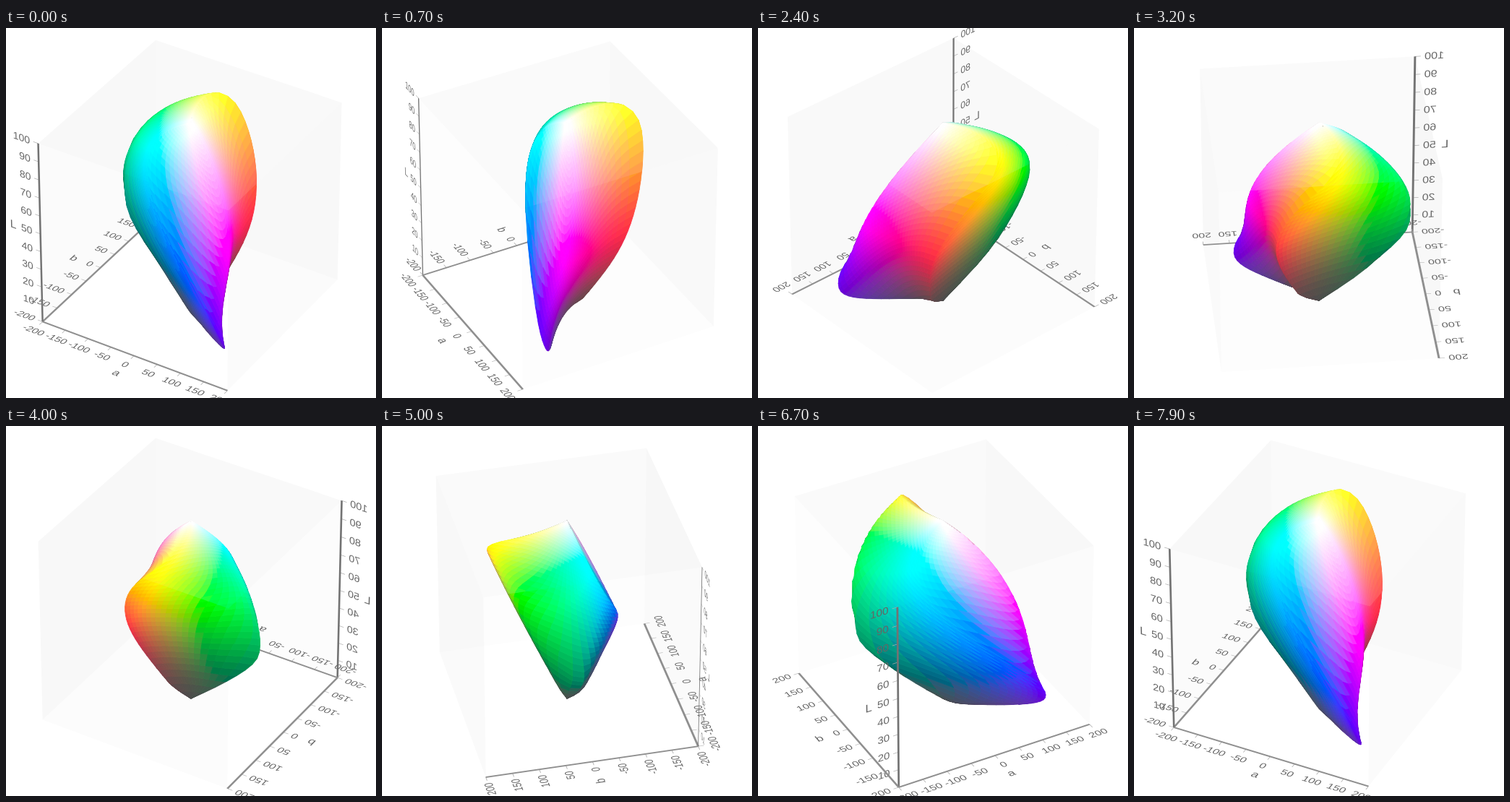
A matplotlib script that plays this animation: 512x512 px, repeating every 8000 ms.

```python
import numpy as np
import matplotlib.pyplot as plt
from matplotlib.animation import FuncAnimation
from matplotlib.collections import PolyCollection
from matplotlib.patches import PathPatch
from matplotlib.path import Path
from matplotlib.textpath import TextPath

SIZE, FRAMES, INTERVAL = 512, 80, 100
POSES = 144                       # distinct poses in one full turn
SIDE = 301.0                      # cube edge in pixels
DISTANCE = 6000.0                 # camera distance
SIN_E, COS_E = np.sqrt(1 / 3), np.sqrt(2 / 3)
WHITE = np.array([0.9505, 1.0, 1.089])
XYZ_TO_RGB = np.array([[3.2406, -1.5372, -0.4986],
                       [-0.9689, 1.8758, 0.0415],
                       [0.0557, -0.2040, 1.0570]])
EXPOSURE, HAZE, TOP_HAZE = 1.15, 0.07, 0.115
X, Y, Z = np.eye(3)


def project(points, theta):
    """Screen position and depth of points in the turning cube."""
    x, y, z = np.moveaxis(np.asarray(points), -1, 0)
    c, s = np.cos(theta), np.sin(theta)
    side, toward = x * c + y * s, x * s - y * c
    depth = toward * COS_E + z * SIN_E
    up = z * COS_E - toward * SIN_E
    scale = DISTANCE / (DISTANCE - depth)
    return np.stack([256 + side * scale, 256 - up * scale], -1), depth


# ---- colour solid -------------------------------------------------------

def lobe(lam, peak, left, right):
    return np.exp(-0.5 * ((lam - peak) / np.where(lam < peak, left, right)) ** 2)


def stimulus(lam):
    """Colour matching functions weighted by daylight."""
    x = (1.056 * lobe(lam, 599.8, 37.9, 31.0) + 0.362 * lobe(lam, 442.0, 16.0, 26.7)
         - 0.065 * lobe(lam, 501.1, 20.4, 26.2))
    y = 0.821 * lobe(lam, 568.8, 46.9, 40.5) + 0.286 * lobe(lam, 530.9, 16.3, 31.1)
    z = 1.217 * lobe(lam, 437.0, 11.8, 36.0) + 0.681 * lobe(lam, 459.0, 26.0, 13.8)
    y = np.where(lam < 430, 0.037 * x, y)
    x = np.where(lam > 645, 2.68 * y, x)
    light = np.interp(lam, [400, 430, 460, 490, 560, 600, 700],
                      [83, 89, 118, 109, 100, 90, 72])
    return np.stack([x, y, z], -1) * light[:, None]


def optimal_solid(rows, cols):
    """Grid of relative XYZ for every band-pass and band-stop colour."""
    spectrum = stimulus(np.linspace(400, 700, 601))
    total = np.cumsum(spectrum, axis=0)
    total = (total - total[0]) / (total[-1] - total[0])
    u = total.sum(1) + np.linspace(0, 0.15, len(total))
    u /= u[-1]

    def integral(t):
        turns = np.floor(t)
        part = [np.interp(t - turns, u, total[:, i]) for i in range(3)]
        return np.stack(part, -1) + turns[..., None]

    width = (0.5 - 0.5 * np.cos(np.linspace(0, np.pi, rows + 1)))[:, None]
    steps = np.linspace(0, 1, cols + 1)
    # Bands first, then notches, so that the sharp ridge lies on a grid line.
    start = np.hstack([steps[:-1] * (1 - width), 1 - width + steps * width])
    return np.clip(integral(start + width) - integral(start), 0, 1)


def lab_to_world(rel):
    f = np.where(rel > 0.008856, np.cbrt(rel), 7.787 * rel + 16 / 116)
    fx, fy, fz = np.moveaxis(f, -1, 0)
    lab = np.stack([500 * (fx - fy), 200 * (fy - fz), 116 * fy - 16], -1)
    return lab * SIDE / np.array([400, 400, 100]) - np.array([0, 0, SIDE / 2])


def quads(grid):
    corners = [grid[:-1, :-1], grid[:-1, 1:], grid[1:, 1:], grid[1:, :-1]]
    return np.stack(corners, axis=2).reshape(-1, 4, 3)


def encode(linear, haze):
    """sRGB of unclipped linear light seen through a white haze."""
    v = np.clip(linear * (1 - haze) + haze, 0, 1)
    return np.clip(np.where(v < 0.0031308, 12.92 * v,
                            1.055 * v ** (1 / 2.4) - 0.055), 0, 1)


relative = optimal_solid(50, 36)
cells = quads(lab_to_world(relative))
linear = EXPOSURE * quads(relative * WHITE @ XYZ_TO_RGB.T).mean(1)
normals = np.cross(cells[:, 2] - cells[:, 0], cells[:, 3] - cells[:, 1])
normals *= np.sign(np.sum(cells.mean(1) * normals))
normals /= np.linalg.norm(normals, axis=1, keepdims=True) + 1e-9


# ---- cube faces and axes ------------------------------------------------

def face(normal, u, v):
    signs = [(-1, -1), (1, -1), (1, 1), (-1, 1)]
    return np.array([normal + i * u + j * v for i, j in signs]) * SIDE / 2


FACES = np.array([face(X, Y, Z), face(Y, X, Z), face(Z, X, Y),
                  face(-X, Y, Z), face(-Y, X, Z)])
CORNER = -np.ones(3) * SIDE / 2


def lettering(text, origin, right, up, size, align):
    glyphs = TextPath((0, 0), text, size=size, prop={"family": "Liberation Sans"})
    v = glyphs.vertices - [align * glyphs.vertices[:, 0].max(), 0.35 * size]
    return origin + v[:, :1] * right + v[:, 1:] * up, glyphs.codes


def strip(start, end, across, width):
    w = across * width / 2
    return np.array([start - w, end - w, end + w, start + w])


class Axis:
    def __init__(self, ax, title, along, out, up, values, low, high,
                 gap, align, shade):
        spots = [CORNER + along * SIDE * (v - low) / (high - low) for v in values]
        texts = [lettering(str(v), p + out * gap, X, up, 16.5, align)
                 for v, p in zip(values, spots)]
        texts.append(lettering(title, CORNER + along * SIDE / 2 + out * 45,
                               X, up, 18.5, 0.5))
        self.points = np.concatenate([t[0] for t in texts])
        self.codes = np.concatenate([t[1] for t in texts])
        self.bars = np.array([strip(p, p + out * 8, along, 0.9) for p in spots]
                             + [strip(CORNER, CORNER + along * SIDE, out, 3)])
        colors = ["0.68"] * len(spots) + [shade]
        self.lines = PolyCollection(np.zeros((len(self.bars), 4, 2)),
                                    facecolors=colors, linewidths=0)
        self.text = PathPatch(Path([(0, 0), (0, 0)]), fc="0.4", lw=0)
        ax.add_collection(self.lines, autolim=False)
        ax.add_patch(self.text)

    def update(self, theta, in_front):
        self.lines.set_verts(project(self.bars, theta)[0])
        self.text.set_path(Path(project(self.points, theta)[0], self.codes))
        for artist in (self.lines, self.text):
            artist.set_zorder(6 if in_front else 2)


fig = plt.figure(figsize=(SIZE / 100, SIZE / 100), dpi=100, facecolor="white")
ax = fig.add_axes([0, 0, 1, 1])
ax.axis("off")

panels = PolyCollection(np.zeros((1, 4, 2)), linewidths=0, zorder=1)
solid = PolyCollection(np.zeros((1, 4, 2)), linewidths=0.6, zorder=3)
hazy = PolyCollection(np.zeros((1, 4, 2)), linewidths=0.6, zorder=4)
for collection in (panels, solid, hazy):
    ax.add_collection(collection, autolim=False)

span = range(-200, 201, 50)
axis_l = Axis(ax, "L", Z, -X, Z, range(10, 101, 10), 0, 100, 14, 1, "0.45")
axis_a = Axis(ax, "a", X, -Y, Y, span, -200, 200, 23, 0.5, "0.56")
axis_b = Axis(ax, "b", Y, -X, Y, span, -200, 200, 14, 1, "0.56")
ax.set_xlim(0, SIZE)
ax.set_ylim(SIZE, 0)


def update(frame):
    pose = frame * POSES // FRAMES
    theta = np.radians(31.5 + 360 * pose / POSES)
    c, s = np.cos(theta), np.sin(theta)

    # The two walls holding the axes show only from their inner side.
    facing = np.abs([s * COS_E, c * COS_E, SIN_E, s * COS_E, c * COS_E])
    shown = np.array([True, True, True, s > 0, c < 0])
    outlines = project(FACES, theta)[0]
    tint = np.zeros((5, 4))
    tint[:, 3] = (1.2 + 4.5 * (1 - facing)) / 255
    panels.set_verts(outlines[shown])
    panels.set_facecolor(tint[shown])

    # Surfaces seen edge-on are dimmer.
    slant = normals @ np.array([s * COS_E, -c * COS_E, SIN_E])
    screen, depth = project(cells, theta)
    visible = np.flatnonzero(slant > 0)
    order = visible[np.argsort(depth[visible].mean(1))]
    lit = linear[order] * np.clip(0.4 + 2.4 * slant[order], 0, 1)[:, None]
    for collection, haze in ((solid, HAZE), (hazy, TOP_HAZE)):
        colors = encode(lit, haze)
        collection.set_verts(screen[order])
        collection.set_facecolor(colors)
        collection.set_edgecolor(colors)
    hazy.set_clip_path(Path(outlines[2]), ax.transData)

    axis_l.update(theta, c > s)
    axis_a.update(theta, c > 0)
    axis_b.update(theta, s < 0)
    return []


anim = FuncAnimation(fig, update, frames=FRAMES, interval=INTERVAL,
                     repeat=True, repeat_delay=0, blit=False)
plt.show()
```
